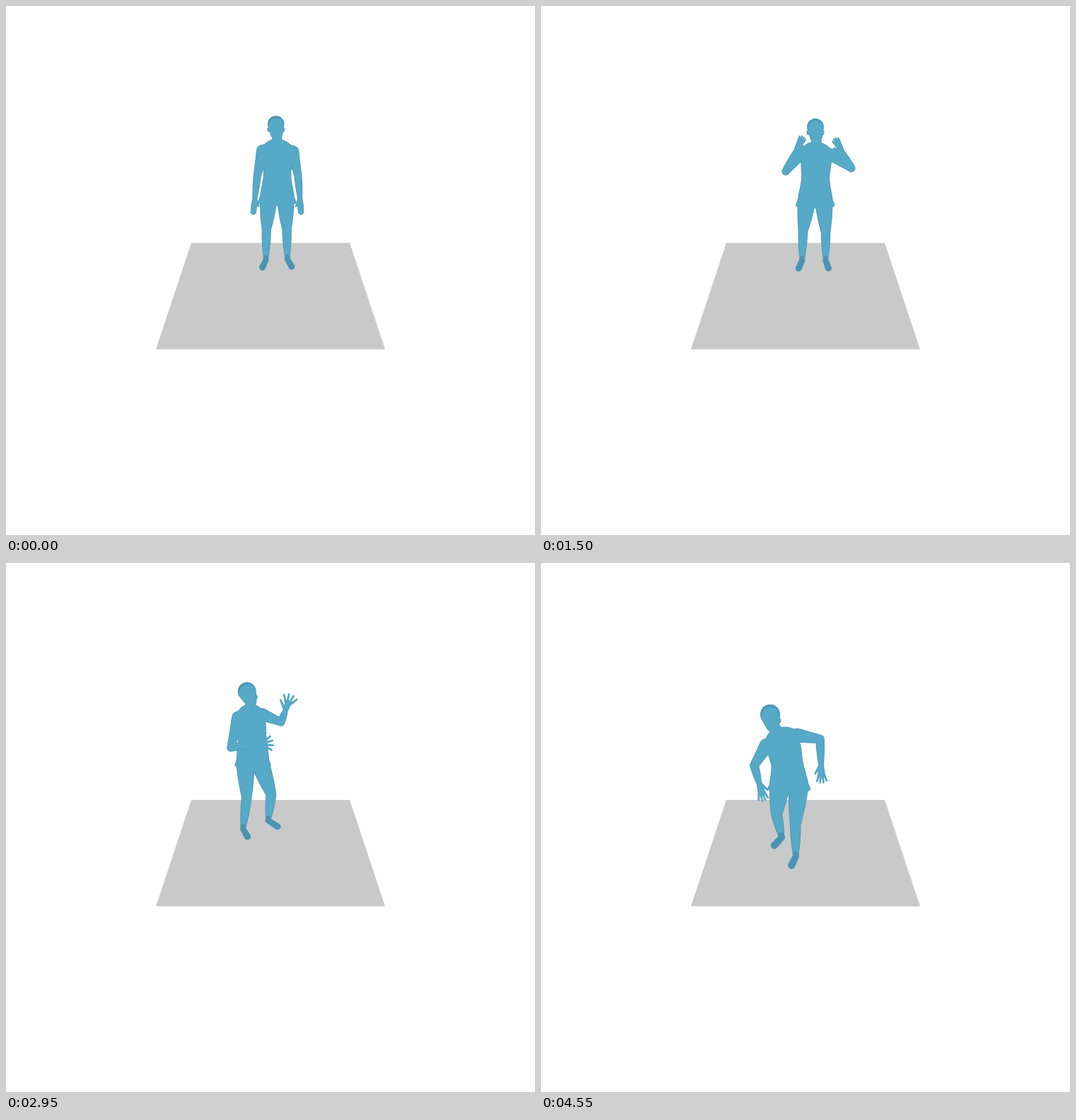
An HTML page for the animation above (4.6 s loop, 748 by 748 pixels).

```html
<!DOCTYPE html>
<html lang="en">
<head>
<meta charset="utf-8">
<title>Walking figure</title>
<style>
html, body { margin: 0; width: 100%; height: 100%; overflow: hidden; background: #fefefe; }
svg { display: block; width: 100vw; height: 100vh; }
</style>
</head>
<body>
<svg viewBox="0 0 748 748">
  <polygon points="262,335 486,335 536,485.5 212,485.5" fill="#c9c9c9"/>
  <g id="figure"></g>
</svg>
<script>
const LOOP = 4600, STEP = 50;
const BODY = '#57a9c8', RIM = '#4b97b5', SHADE = '#4a94b2';

// Key poses. turn: 0 faces us, 1 is profile; open: finger spread.
// Arms: elbow, wrist. Legs: knee, ankle, sideways reach of the foot.
const stand = {
  t: 600, turn: 0, open: .03, head: [381.7, 167], neck: [384.3, 198], hip: [383.3, 276],
  armL: [355.3, 240, 352, 271], armR: [413, 240, 415.5, 271],
  legL: [368.3, 315, 367.5, 356, -5], legR: [397, 315, 397.8, 355, 6]
};
const handsUp = {
  t: 1500, turn: 0, open: .08, head: [388, 171], neck: [390, 202], hip: [387.7, 280],
  armL: [346, 234, 360, 206], armR: [439, 229.5, 427, 208],
  legL: [370.5, 318, 369.3, 357, -5], legR: [402.5, 319, 402.5, 357, 4]
};
const stepUp = {
  t: 2400, turn: .95, open: .15, head: [349.3, 181.7], neck: [345, 211], hip: [341, 284],
  armL: [326, 262, 361, 264], armR: [357, 238, 378, 243],
  legL: [344.5, 332, 344.5, 374, 1], legR: [398, 284, 402, 336, 20]
};
const wave = {
  t: 2950, turn: .36, open: .24, head: [340.7, 181.5], neck: [344.5, 209], hip: [349, 284],
  armL: [318, 261, 354, 257], armR: [389, 225, 395, 209],
  legL: [340.3, 331, 335.5, 373, 6], legR: [375, 327, 371, 361, 13]
};
const turnBack = {
  t: 3750, turn: 0, open: .06, head: [354.5, 187], neck: [358.5, 214], hip: [359, 292],
  armL: [326, 254, 318.5, 281], armR: [395.5, 257, 395, 288],
  legL: [346.5, 338, 348.5, 378, -7], legR: [373, 338, 373.5, 368, 4]
};
const stride = {
  t: 4550, turn: .1, open: .13, head: [324, 214], neck: [338, 243], hip: [350.5, 318],
  armL: [301.5, 286, 308, 310], armR: [394.5, 249, 396, 284],
  legL: [333, 355, 339.8, 385, -10], legR: [359.7, 369, 360.3, 412, -6]
};
const keys = [stand, handsUp, stepUp, wave, turnBack, stride];

// Monotone cubic through p0..p3 at times t0..t3, between p1 and p2.
function glide(p, t, now) {
  const rate = i => t[i + 1] > t[i] ? (p[i + 1] - p[i]) / (t[i + 1] - t[i]) : 0;
  const slope = i => {
    const a = rate(i - 1), b = rate(i);
    return a * b > 0 ? 2 * a * b / (a + b) : 0;
  };
  const span = t[2] - t[1], u = (now - t[1]) / span;
  return p[1] + (p[2] - p[1]) * u * u * (3 - 2 * u)
    + span * u * (1 - u) * ((1 - u) * slope(1) - u * slope(2));
}

function poseAt(now) {
  if (now <= stand.t) return stand;
  const k = Math.max(1, keys.findIndex(key => key.t >= now));
  const near = [k - 2, k - 1, k, k + 1].map(i => keys[Math.min(Math.max(i, 0), keys.length - 1)]);
  const times = near.map(key => key.t), out = {};
  for (const name in stand) {
    const v = near.map(key => key[name]);
    out[name] = Array.isArray(v[0])
      ? v[0].map((_, j) => glide(v.map(a => a[j]), times, now))
      : glide(v, times, now);
  }
  return out;
}

const f = n => n.toFixed(2);
const lerp = (a, b, u) => a + (b - a) * u;
const mix = (a, b, u) => [lerp(a[0], b[0], u), lerp(a[1], b[1], u)];
const add = (p, x, y) => [p[0] + x, p[1] + y];
const unit = (a, b) => {
  const x = b[0] - a[0], y = b[1] - a[1], d = Math.hypot(x, y) || 1;
  return [x / d, y / d];
};

function disc([x, y], r) {
  const arc = s => `A${f(r)} ${f(r)} 0 1 0 ${f(x + s * r)} ${f(y)}`;
  return `M${f(x - r)} ${f(y)}${arc(1)}${arc(-1)}Z`;
}

// Hull of two circles.
function capsule(p, q, r1, r2) {
  const dx = q[0] - p[0], dy = q[1] - p[1], d = Math.hypot(dx, dy);
  if (d <= Math.abs(r1 - r2) + .01) return r1 > r2 ? disc(p, r1) : disc(q, r2);
  const a = Math.atan2(dy, dx), b = Math.acos((r1 - r2) / d);
  const at = (c, r, g) => f(c[0] + r * Math.cos(g)) + ' ' + f(c[1] + r * Math.sin(g));
  const big = b > Math.PI / 2 ? 1 : 0;
  return `M${at(p, r1, a + b)}L${at(q, r2, a + b)}A${f(r2)} ${f(r2)} 0 ${big} 0 ${at(q, r2, a - b)}` +
    `L${at(p, r1, a - b)}A${f(r1)} ${f(r1)} 0 ${1 - big} 0 ${at(p, r1, a + b)}Z`;
}

// Tapered bone with a muscle bulge in the middle.
function bone(p, q, r1, r2, bulge) {
  const n = 8, r = u => lerp(r1, r2, u) + bulge * Math.sin(Math.PI * u);
  let d = '';
  for (let i = 0; i < n; i++)
    d += capsule(mix(p, q, i / n), mix(p, q, (i + 1) / n), r(i / n), r((i + 1) / n));
  return d;
}

// Closed smooth curve.
function blob(pts) {
  const n = pts.length, at = i => pts[(i + n) % n];
  let d = 'M' + pts[0].map(f).join(' ');
  for (let i = 0; i < n; i++) {
    const [a, b, c, e] = [at(i - 1), at(i), at(i + 1), at(i + 2)];
    d += 'C' + [b[0] + (c[0] - a[0]) / 6, b[1] + (c[1] - a[1]) / 6,
      c[0] - (e[0] - b[0]) / 6, c[1] - (e[1] - b[1]) / 6, c[0], c[1]].map(f).join(' ');
  }
  return d + 'Z';
}

// Nearer means lower on the stage and larger.
const sizeOf = pose => 1 + (pose.hip[1] - stand.hip[1]) * .0036;

// The spine bends from the neck into an upright pelvis.
function spine({ neck, hip }) {
  const bend = [hip[0], (neck[1] + hip[1]) / 2];
  return u => {
    const a = mix(neck, bend, u), b = mix(bend, hip, u);
    return { p: mix(a, b, u), dir: unit(a, b) };
  };
}

function trunkPath(pose, inset) {
  const s = sizeOf(pose), at = spine(pose), { turn, neck, head } = pose;
  const left = [], right = [];
  const ring = (p, dir, w) => {
    const r = w * s - inset;
    left.push([p[0] - dir[1] * r, p[1] + dir[0] * r]);
    right.unshift([p[0] + dir[1] * r, p[1] - dir[0] * r]);
  };
  const level = (u, w, slim) => {
    const { p, dir } = at(u);
    ring(p, dir, w * (1 - slim * turn));
  };
  ring(mix(neck, head, .3), at(0).dir, 7.3);
  level(0, 20, .55);
  level(.25, 21.3, .13);
  level(.55, 19.8, .02);
  level(.9, 24.2, .2);
  level(1.06, 23.3, .25);
  return blob(left.concat(right));
}

function headPath(pose, inset) {
  const s = sizeOf(pose), side = Math.sqrt(Math.max(0, pose.turn)), skull = pose.head;
  const jaw = add(skull, (1 + 6.5 * side) * s, (14 - 2 * side) * s);
  const knob = x => capsule(add(skull, x * s, 7 * s), add(skull, x * s, 9.5 * s), 2 - inset, 1.6 - inset);
  return capsule(mix(skull, jaw, inset * .16), jaw, (11.8 + 1.4 * side) * s - inset * 1.4, 8.5 * s - inset)
    + bone(jaw, pose.neck, 7 * s - inset, 7 * s - inset, 0)
    + knob(-10.4 * (1 - side)) + knob(10.4 + 3.8 * side);
}

function handPath(wrist, dir, pose, inset) {
  const s = sizeOf(pose), len = 24 * s, thin = inset * .5;
  const at = (u, side) => add(wrist, dir[0] * len * u - dir[1] * side, dir[1] * len * u + dir[0] * side);
  // The thumb points to the head side.
  const cross = dir[0] * (pose.head[1] - wrist[1]) - dir[1] * (pose.head[0] - wrist[0]);
  const thumb = Math.max(-1, Math.min(1, cross / 12)) * (5.5 + pose.open * 25);
  let d = capsule(wrist, at(.42, 0), 3.5 - inset, 4.2 * s - inset);
  for (let i = -1.5; i < 2; i++) {
    const g = i * pose.open, reach = 1 - Math.abs(i) * .07;
    d += capsule(at(.4, i * 1.8), at(reach * Math.cos(g), reach * Math.sin(g) * len + i * 1.3),
      1.8 - thin, 1.2 - thin);
  }
  return d + capsule(at(.12, thumb * .25), at(.48, thumb), 2.3 - thin, 1.3 - thin);
}

function armPath(pose, side, inset) {
  const v = side < 0 ? pose.armL : pose.armR, s = sizeOf(pose);
  const { dir } = spine(pose)(0), out = side * 21.5 * s * (1 - .6 * pose.turn), drop = 7.5 * s;
  const shoulder = add(pose.neck, dir[1] * out + dir[0] * drop, -dir[0] * out + dir[1] * drop);
  const elbow = v.slice(0, 2), wrist = v.slice(2), r = w => w * s - inset;
  return bone(pose.neck, shoulder, r(5.5), r(8.8), 0)
    + bone(shoulder, elbow, r(8.8), r(5.5), -.2) + bone(elbow, wrist, r(5.5), r(3.5), .5)
    + handPath(wrist, unit(elbow, wrist), pose, inset);
}

function legPath(pose, side, inset) {
  const v = side < 0 ? pose.legL : pose.legR, s = sizeOf(pose), wide = s * (1 + .15 * pose.turn);
  const hip = add(pose.hip, side * 12.2 * s * (1 - .45 * pose.turn), 0);
  const knee = v.slice(0, 2), ankle = v.slice(2, 4), r = w => w * wide - inset;
  return bone(hip, knee, r(12.2), r(6.7), .7) + bone(knee, ankle, r(6.7), r(3.7), .8);
}

// The toe lies on a flattened circle round the ankle.
function footPath(pose, side) {
  const [kx, ky, ax, ay, reach] = side < 0 ? pose.legL : pose.legR, s = sizeOf(pose);
  const ankle = [ax, ay], down = unit([kx, ky], ankle);
  const heel = add(ankle, down[0] * 3, down[1] * 3);
  const toe = add(ankle, reach, 14 * s * Math.sqrt(1 - (reach / 22) ** 2));
  return capsule(ankle, heel, 3.7 * s, 4 * s) + capsule(heel, toe, 4 * s, 4.5 * s);
}

const figure = document.getElementById('figure');
function layer(fill) {
  const p = document.createElementNS('http://www.w3.org/2000/svg', 'path');
  p.setAttribute('fill', fill);
  return figure.appendChild(p);
}
const shapes = (pose, inset) => [
  armPath(pose, 1, inset), legPath(pose, 1, inset), legPath(pose, -1, inset),
  trunkPath(pose, inset), headPath(pose, inset), armPath(pose, -1, inset)
];
const rims = shapes(stand, 0).map(() => layer(RIM));
const fills = rims.map(() => layer(BODY));
const feet = [1, -1].map(() => layer(SHADE));
const nearRim = layer(RIM), nearFill = layer(BODY);
const put = (el, d) => el.setAttribute('d', d);

function draw(t) {
  const pose = poseAt(t), outer = shapes(pose, 0), inner = shapes(pose, .9);
  rims.forEach((el, i) => put(el, outer[i]));
  fills.forEach((el, i) => put(el, inner[i]));
  feet.forEach((el, i) => put(el, footPath(pose, i ? -1 : 1)));
  // Turned sideways, the near arm stands out against the trunk.
  put(nearRim, outer[5]);
  put(nearFill, inner[5]);
  nearRim.setAttribute('opacity', Math.min(.5, pose.turn));
}

function tick(now) {
  draw(Math.floor(now % LOOP / STEP) * STEP);
  requestAnimationFrame(tick);
}
draw(0);
requestAnimationFrame(tick);
</script>
</body>
</html>
```
